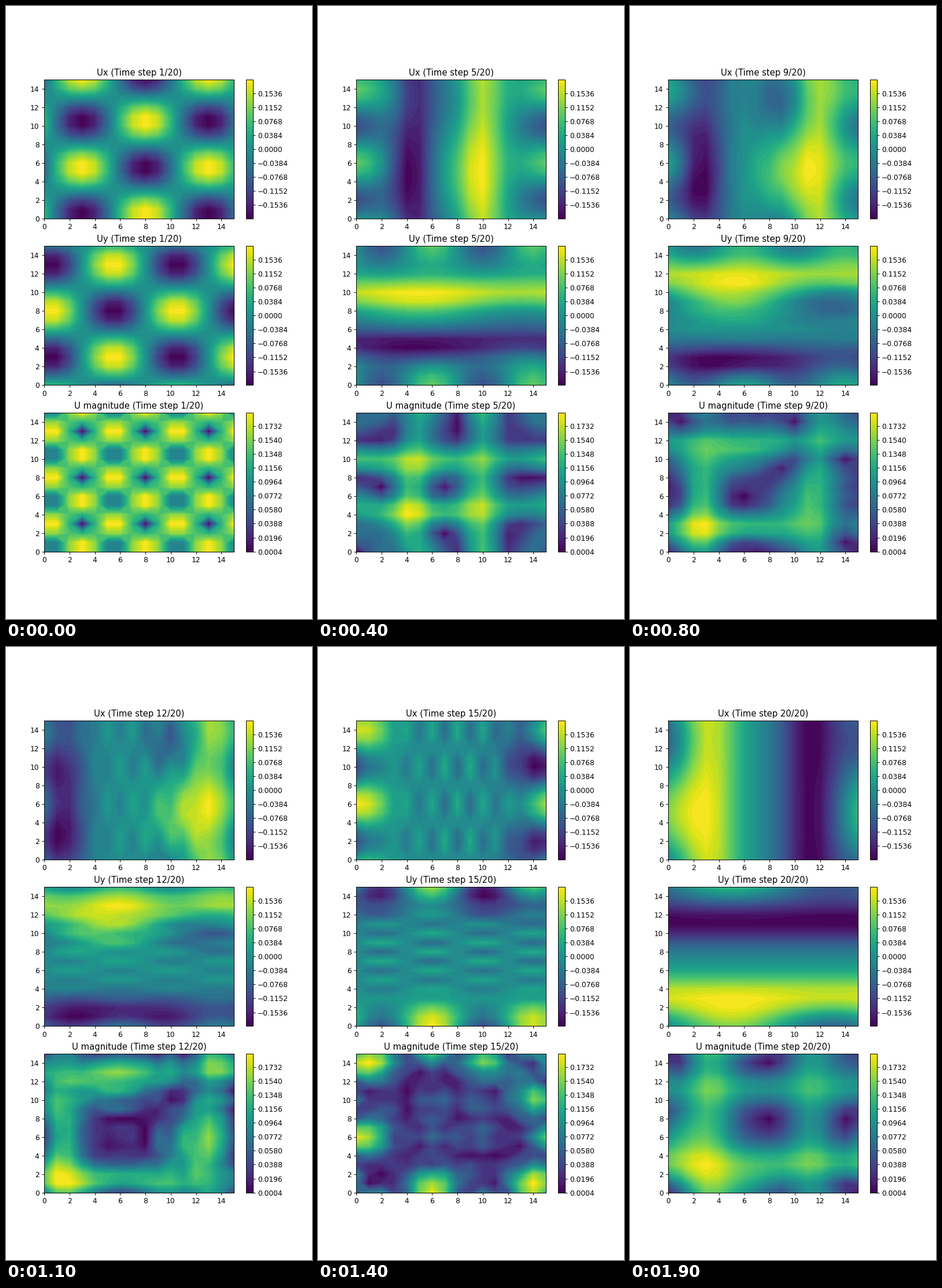
Recreate the animation shown at these times as a matplotlib script. Size 529 px wide and 1058 px high, loop 2 s.

```python
import numpy as np
import matplotlib.pyplot as plt
from matplotlib.animation import FuncAnimation
from matplotlib.cm import ScalarMappable
from matplotlib.colors import Normalize

SIZE = 16
STEPS = 20
grid = np.arange(SIZE)
X, Y = np.meshgrid(grid, grid)


def at(step, marks, values):
    return np.interp(step, marks, values)


def ridge(centre, width):
    """Bell-shaped ridge along y, periodic in x."""
    gap = (X - centre + SIZE / 2) % SIZE - SIZE / 2
    return np.exp(-(gap / width) ** 2)


def wave(count, peak):
    """Periodic wave in y with its crest at the given height."""
    return np.cos(2 * np.pi * count * (Y - peak) / SIZE)


def cells(step):
    """Cellular start flow that dies away over the first steps."""
    fade = max(0, np.cos(np.pi * min(step - 1, 4) / 8))
    px, py = (2 * np.pi * (a - 0.5) / 10 for a in (X, Y))
    return -10 * fade * np.sin(px) * np.cos(py)


def fronts(step):
    """Two opposite fronts that leave the middle and wrap round the sides."""
    shift = at(step, [1, 5, 7, 12, 15, 17, 20], [1, 2.7, 3.6, 5.9, 9.3, 10.5, 11.9])
    height = at(step, [1, 5, 12, 15, 17, 20], [0, 8, 6.5, 3.5, 7.5, 8.7])
    width = 1.7 + 0.05 * (step - 5)
    drift = at(step, [12, 20], [0, 1.2])
    return drift + height * (ridge(7.2 + shift, width) - ridge(7.2 - shift, width))


def swells(step):
    """Bulges along the fronts, varying with y."""
    rise = at(step, [1, 5, 7, 12, 15, 17, 20], [0, 2, 4.5, 4, 1.5, 5.2, 4.5])
    dip = at(step, [1, 5, 7, 12, 15], [0, 2, 3, 1.5, 0])
    edge = at(step, [1, 5, 7, 12, 15, 17, 20], [0, 5, 3, 2, 6, 1, 0])
    right = ridge(at(step, [7, 12, 17, 20], [8.3, 10.5, 15.8, 16]), 2.3)
    left = ridge(at(step, [5, 12], [3.5, 1.5]), 1.6)
    return ((rise * right - dip * left) * wave(1, 5)
            + edge * ridge(15.6, 2.5) * wave(2, 6))


def ripples(step):
    """Alternating columns that appear while the fronts pass each other."""
    height = at(step, [8, 12, 15, 18], [0, -1.3, 2.2, 0])
    return height * (-1.0) ** X * np.sin(np.pi * X / SIZE) ** 2 * wave(2, 6)


def velocity(step):
    return cells(step) + fronts(step) + swells(step) + ripples(step)


fig, axes = plt.subplots(3, 1, figsize=(6, 12), dpi=88.1667)
names = ("Ux", "Uy", "U magnitude")
scales = [(-0.1912, 0.1912), (-0.1912, 0.1912), (0.0004, 0.19144)]
signed = 0.0384 * np.arange(-4, 5)
ticks = [signed, signed, 0.0004 + 0.0192 * np.arange(10)]

for ax, (low, high), marks in zip(axes, scales, ticks):
    bar = ScalarMappable(Normalize(low, high), "viridis")
    fig.colorbar(bar, ax=ax, ticks=marks)


def draw(frame):
    step = frame + 1
    ux = velocity(step)
    uy = ux.T  # the flow is mirrored about the diagonal
    for ax, name, field in zip(axes, names, (ux, uy, np.hypot(ux, uy))):
        ax.clear()
        # Every step is coloured over its own range.
        levels = np.linspace(field.min(), field.max(), 40)
        ax.contourf(grid, grid, field, levels=levels, cmap="viridis")
        ax.set_title(f"{name} (Time step {step}/{STEPS})")
    return []


anim = FuncAnimation(fig, draw, frames=STEPS, init_func=lambda: draw(0),
                     interval=100, repeat=True, repeat_delay=0)
plt.show()
```
